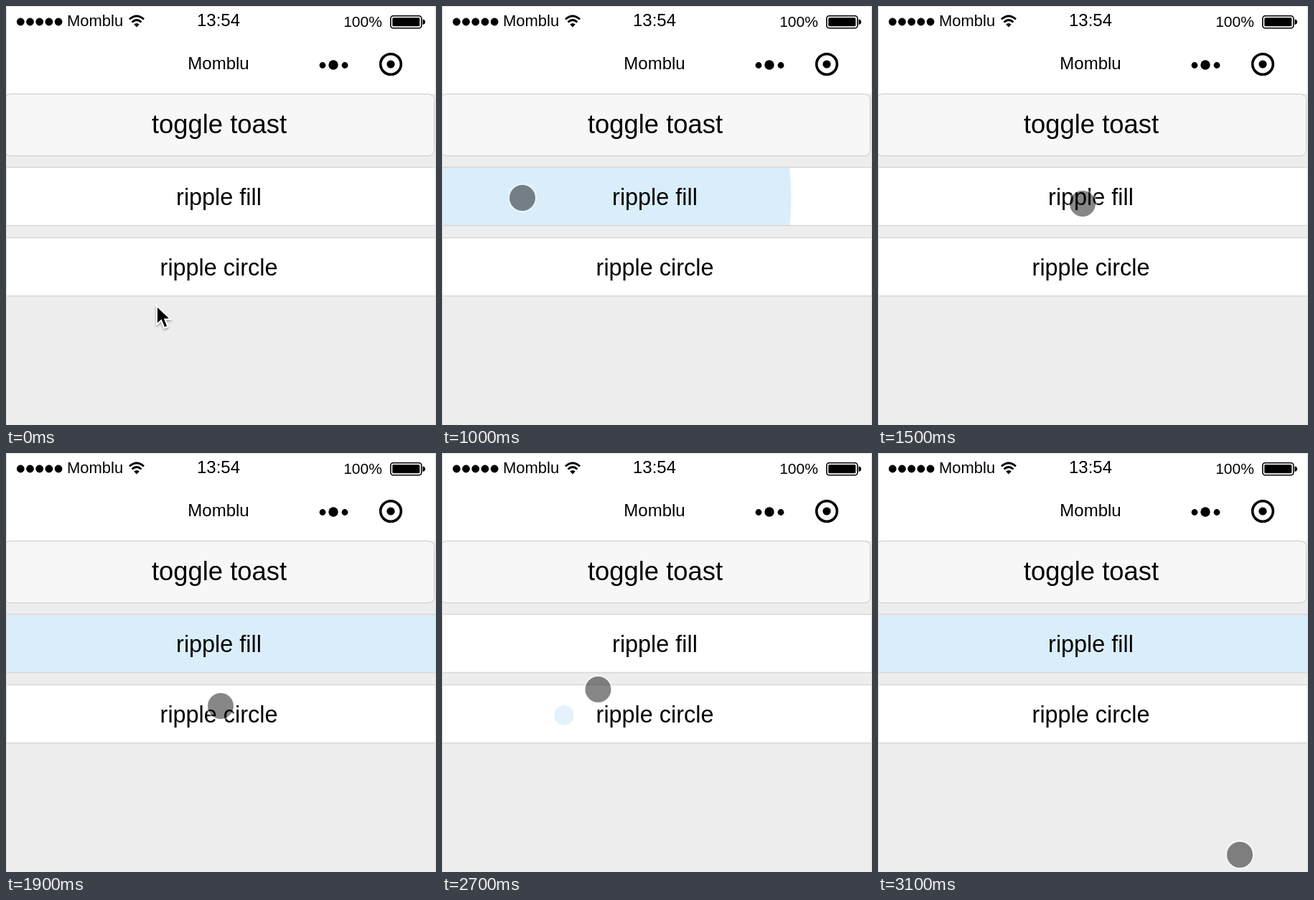
An HTML page that plays this animation: 599x583 px, repeating every 3200 ms.

```html
<!DOCTYPE html>
<html lang="en">
<head>
<meta charset="utf-8">
<style>
  html, body { margin: 0; width: 100%; height: 100%; overflow: hidden; background: #ededed; }
  svg { display: block; }
  text { font-family: "Liberation Sans", Arial, sans-serif; text-anchor: middle; }
  .label { font-size: 32.4px; }
  .rule { stroke: #d6d6d6; stroke-width: 1.5; }
  .ripple { fill: #d9eefa; }
</style>
</head>
<body>
<svg width="599" height="583" viewBox="0 0 599 583">
  <defs>
    <clipPath id="fillRow"><path d="M0 225H598V305H0Z"/></clipPath>
    <clipPath id="circleRow"><path d="M0 323H598V403H0Z"/></clipPath>
    <filter id="shadow" x="-50%" y="-50%" width="200%" height="200%">
      <feDropShadow dx="0" dy="2" stdDeviation="1.5" flood-opacity=".35"/>
    </filter>
  </defs>

  <path fill="#fff" d="M0 0H599V122H0ZM0 224H599V306H0ZM0 322H599V404H0Z"/>
  <rect x="-1.5" y="122.5" width="598" height="86" rx="8" fill="#f7f7f7" stroke="#c9c9c9"/>
  <g id="ripples"></g>
  <path class="rule" d="M0 224.5H599M0 305.5H599M0 322.5H599M0 403.5H599"/>
  <path d="M.5 583V.5H598.5V583" fill="none" stroke="#dcdcdc"/>

  <!-- status bar -->
  <path d="M20.3 22h53" stroke="#000" stroke-width="10.8" stroke-linecap="round" stroke-dasharray="0 13.2"/>
  <text x="124" y="28" font-size="22">Momblu</text>
  <g fill="none" stroke="#000" stroke-width="2.8">
    <path d="M172 18.5Q182 9.5 192 18.5M175.5 22.5Q182 16.5 188.5 22.5"/>
    <path d="M178.2 25.4Q182 22.4 185.8 25.4L182 29.5Z" fill="#000" stroke="none"/>
  </g>
  <text x="296" y="28" font-size="24">13:54</text>
  <text x="497" y="28.5" font-size="21">100%</text>
  <rect x="535.8" y="13.8" width="43" height="17" rx="3.5" fill="none" stroke="#000" stroke-width="1.6"/>
  <rect x="538.3" y="16.3" width="38" height="12" rx="1.5"/>
  <path d="M580.5 18.5Q584 19 584 22.3T580.5 26Z"/>

  <!-- title bar -->
  <text x="296" y="88" font-size="24">Momblu</text>
  <circle cx="441" cy="82.5" r="4.4"/>
  <circle cx="456" cy="82" r="6.7"/>
  <circle cx="472" cy="82.5" r="4.4"/>
  <circle cx="536" cy="81" r="14.3" fill="none" stroke="#000" stroke-width="3.6"/>
  <circle cx="536" cy="81" r="5.6"/>

  <text class="label" x="297" y="177" style="font-size:36.4px">toggle toast</text>
  <text class="label" x="296.5" y="277">ripple fill</text>
  <text class="label" x="296.5" y="374.5">ripple circle</text>

  <g id="pointer">
    <path id="arrow" d="M0 0V26L6.2 20.5L10.5 31L15.5 29L11.3 18.8H19.5Z"
      stroke="#fff" stroke-width="2" filter="url(#shadow)"/>
    <g id="touch">
      <circle r="19" fill="none" stroke="#fff" stroke-opacity=".4" stroke-width="2.5"/>
      <circle r="18" fill-opacity=".47"/>
    </g>
  </g>
</svg>
<script>
const LOOP = 3200, STEP = 100;
const $ = id => document.getElementById(id);

// time, x, y
const path = [
  [0, 210, 417], [100, 207, 405], [300, 150, 320], [400, 150, 320],
  [600, 112, 267], [1000, 112, 267], [1300, 273, 273], [1500, 285, 275],
  [1600, 285, 275], [1900, 299, 352], [2200, 442, 366], [2300, 442, 366],
  [2500, 170, 366], [2600, 170, 366], [2800, 265, 292], [2900, 281, 291],
  [3100, 504, 559], [3200, 504, 559]
];

const fill = { row: "fillRow", life: 600, radius: a => 1.2 * a, alpha: a => (600 - a) / 100 };
const circle = { row: "circleRow", life: 400, radius: a => 41 * Math.min(1, a / 300), alpha: a => 1 - a / 400 };

const taps = [
  [fill, 688, 112, 267], [fill, 1520, 285, 275], [circle, 2175, 442, 366],
  [circle, 2600, 170, 365], [fill, 2812, 265, 292]
].map(([kind, start, x, y]) => {
  const group = document.createElementNS("http://www.w3.org/2000/svg", "g");
  group.setAttribute("clip-path", `url(#${kind.row})`);
  group.innerHTML = `<circle class="ripple" cx="${x}" cy="${y}"/>`;
  $("ripples").append(group);
  return { kind, start, dot: group.firstChild };
});

function pointerAt(t) {
  const i = path.findIndex(p => p[0] > t);
  const [t0, x0, y0] = path[i - 1], [t1, x1, y1] = path[i];
  const k = (t - t0) / (t1 - t0);
  return [x0 + (x1 - x0) * k, y0 + (y1 - y0) * k];
}

function draw(t) {
  for (const { kind, start, dot } of taps) {
    const age = t - start;
    const live = age >= 0 && age < kind.life;
    dot.setAttribute("r", live ? kind.radius(age) : 0);
    dot.setAttribute("opacity", live ? Math.min(1, kind.alpha(age)) : 0);
  }
  $("pointer").setAttribute("transform", `translate(${pointerAt(t)})`);
  $("arrow").style.display = t < STEP ? "" : "none";
  $("touch").style.display = t < STEP ? "none" : "";
}

const origin = performance.now();
function tick() {
  const t = (performance.now() - origin) % LOOP;
  draw(Math.floor(t / STEP) * STEP);
  requestAnimationFrame(tick);
}
tick();
</script>
</body>
</html>
```
